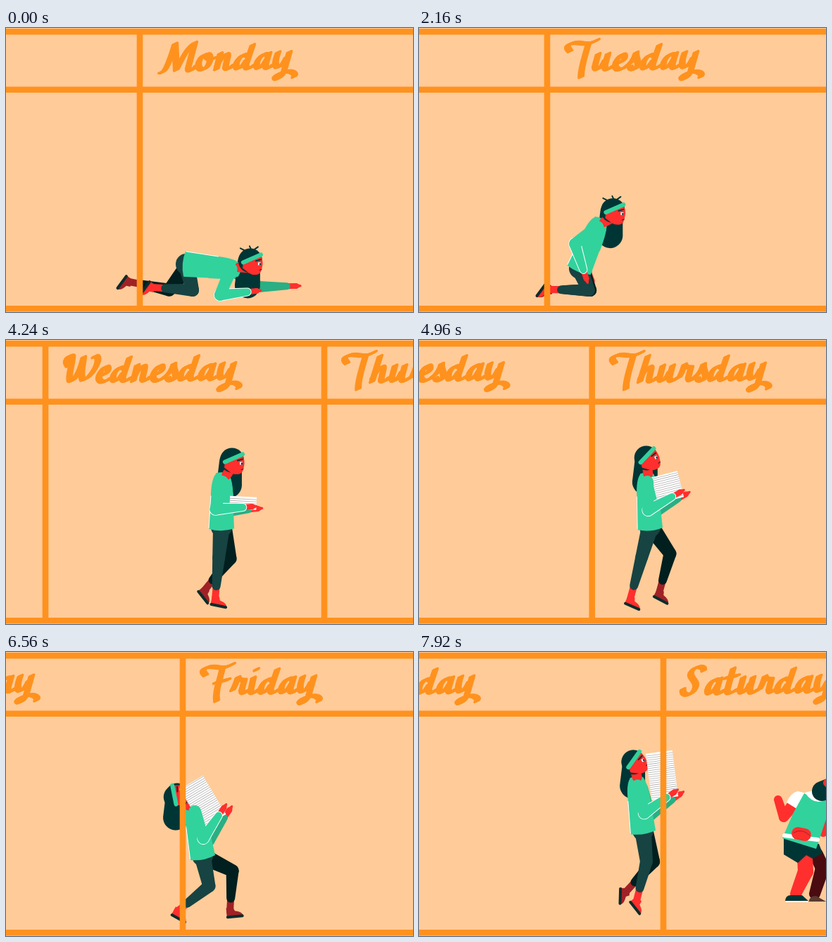
Write an HTML page with a canvas that moves like this. It is 578 px wide and 404 px high and loops after 8000 ms.

```html
<!DOCTYPE html>
<html lang="en">
<head>
<meta charset="utf-8">
<title>Week</title>
<style>
html, body { margin: 0; width: 100%; height: 100%; overflow: hidden; background: #ffcb99; }
canvas { display: block; }
</style>
</head>
<body>
<canvas id="stage" width="578" height="404" role="img"
  aria-label="Monday Tuesday Wednesday Thursday Friday Saturday"></canvas>
<script>
const g = document.getElementById('stage').getContext('2d');
const ORANGE = '#ff921e', PAPER = '#ffcb99', GREEN = '#32d29d', GREEN2 = '#2aae83',
  HAIR = '#003535', PANTS = '#174342', PANTS2 = '#001f1e', SKIN = '#ff2f2d', SKIN2 = '#a02226', SOLE = '#0a2c2c';

// Brush lettering: advance width, then the pen path with the baseline at y = 0
const glyphs = {
  M: [54, 'M3 0C9 3 18-22 24-40L25-3C32-16 42-36 52-41L42-6C41 1 48-1 54-9'],
  T: [38, 'M6-30C-4-40 10-43 22-41C32-39 38-41 45-45M32-39C28-24 21-8 21 7'],
  W: [46, 'M6-26C0-34 6-42 12-40C13-30 5-14 8-5C14-2 24-22 28-38C27-26 22-14 26-6C34-6 46-22 48-32C49-38 46-41 43-38'],
  F: [42, 'M6-30C-4-40 10-43 22-41C32-39 38-41 45-45M30-39C27-24 19-8 21 7M20-19L38-23'],
  S: [33, 'M31-36C32-44 18-43 13-34C9-25 24-22 18-10C12 1-1 0 1-10'],
  o: [25, 'M15-24C6-24 1-12 3-6C5-1 13-2 17-10C21-18 19-25 14-24C14-18 20-15 26-19'],
  n: [28, 'M9-25L3-3M4-8C8-16 14-24 18-24C22-24 16-10 16-5C17-1 22-3 28-9'],
  d: [29, 'M19-21C12-26 3-14 3-7C3-1 10-2 18-15M27-36L17-8C16-1 22-2 29-8'],
  a: [26, 'M19-22C12-26 3-14 3-7C3-1 10-2 18-16M21-24L16-8C15-1 21-2 27-8'],
  y: [33, 'M8-25C4-15 2-5 7-4C12-4 17-12 20-18M24-25L16 1C12 13 3 15 3 10C5 5 22 0 28 4C31 6 32 8 30 10'],
  u: [29, 'M8-25L3-8C3 0 11-3 18-17M22-25L17-8C17-1 22-2 29-8'],
  e: [20, 'M5-12C14-12 18-18 16-23C12-27 2-14 3-7C5 0 13-2 20-8'],
  s: [19, 'M0-8C6-12 11-20 13-26C11-18 18-12 14-6C11-1 5-2 4-6'],
  h: [28, 'M15-39L3-3M4-8C8-16 14-24 18-24C22-24 16-10 16-5C17-1 22-3 28-9'],
  r: [24, 'M2-8C6-14 8-20 10-26C10-22 14-22 19-22L15-8C15-1 20-3 25-8'],
  i: [15, 'M8-25L4-8C3-1 9-2 16-9M12-36L13-37'],
  t: [20, 'M14-38L5-8C4-1 10-2 20-9M3-25L20-28']
};
for (const k in glyphs) glyphs[k][1] = new Path2D(glyphs[k][1]);

const days = [['Monday', 0], ['Tuesday', 421], ['Wednesday', 842], ['Thursday', 1238], ['Friday', 1696], ['Saturday', 2154]];
const scrollKeys = [[0, -190], [1200, 34], [2160, 239], [4240, 786], [5680, 1198.5], [6560, 1445], [7920, 1807]];

// Key poses: time, hip x and y, lean, neck angle, hand from shoulder, paper stack angle and height
const poses = [
  [0, 256, 336, 1.68, 1.35, 60, 31, 0, 0],
  [1600, 256, 336, 1.68, 1.35, 60, 31, 0, 0],
  [2160, 228, 342, .41, .92, -16, 73, 0, 0],
  [2960, 302, 266, .1, .65, 12, 70, 0, 0],
  [4240, 306, 266, .02, .55, 42, 35, .05, 18],
  [5680, 350, 266, -.14, -.37, 51, -6, -.54, 58],
  [6560, 279, 290, -.17, -.78, 41, -5, -.54, 64],
  [7920, 318, 254, -.12, -.04, 52, 9, -.13, 66]
];
// quarter steps of the walk
const paceKeys = [[2160, -5], [4240, 8], [5680, 17], [6560, 21], [7920, 28]];

const mix = (a, b, k) => a + (b - a) * k;
const ease = k => k * k * (3 - 2 * k);
const ramp = (t, from, to) => ease(Math.max(0, Math.min(1, (t - from) / (to - from))));
function sample(keys, t, curve = k => k) {
  let i = 0;
  while (i < keys.length - 2 && t >= keys[i + 1][0]) i++;
  const a = keys[i], b = keys[i + 1], k = curve((t - a[0]) / (b[0] - a[0]));
  return a.slice(1).map((v, n) => mix(v, b[n + 1], k));
}

const toward = (a, b, k) => [mix(a[0], b[0], k), mix(a[1], b[1], k)];
const swing = ([x, y], length, angle) => [x + length * Math.sin(angle), y - length * Math.cos(angle)];
function joint(a, c, la, lb, side) {
  const dx = c[0] - a[0], dy = c[1] - a[1], d = Math.hypot(dx, dy);
  const bend = Math.acos(Math.max(-1, Math.min(1, (la * la + d * d - lb * lb) / (2 * la * d))));
  const ang = Math.atan2(dy, dx) + side * bend;
  return [a[0] + la * Math.cos(ang), a[1] + la * Math.sin(ang)];
}
function taper(a, b, ra, rb, color) {
  const ang = Math.atan2(b[1] - a[1], b[0] - a[0]);
  g.fillStyle = color;
  g.beginPath();
  g.arc(...a, ra, ang + Math.PI / 2, ang - Math.PI / 2);
  g.arc(...b, rb, ang - Math.PI / 2, ang + Math.PI / 2);
  g.fill();
}
function shape(path, color) {
  g.fillStyle = color;
  g.fill(new Path2D(path));
}
function line(path, color, width) {
  g.strokeStyle = color;
  g.lineWidth = width;
  g.stroke(new Path2D(path));
}
function placed([x, y], angle, draw) {
  g.save();
  g.translate(x, y);
  g.rotate(angle);
  draw();
  g.restore();
}

// Foot from the hip: x, ground y, toe angle; side is 1 for the near leg, -1 for the far one
function foot(t, side) {
  const kneel = ramp(t, 1600, 2160);
  const down = [mix(-66 + 18 * side * Math.cos(t * Math.PI / 400), -44, kneel), mix(365 + 4 * side, 372, kneel), 2.2];
  const phase = sample(paceKeys, t)[0] * Math.PI / 2, s = side * Math.sin(phase), c = side * Math.cos(phase);
  const lift = Math.max(0, -c), hop = ramp(t, 7600, 7920);
  const up = [9 * c - 36 * s - 18 * c * c, 369 - 13 * lift - 15 * hop, .2 + .3 * s + .7 * lift + .7 * hop];
  return down.map((v, i) => mix(v, up[i], ramp(t, 2200, 2960)));
}
function leg(hip, [x, y, angle], cloth, skin) {
  const ankle = [hip[0] + x, y], knee = joint(hip, ankle, 44, 58, -1);
  knee[1] = Math.min(knee[1], 373);
  const cuff = toward(knee, ankle, .68);
  taper(cuff, ankle, 5, 5, skin);
  placed(ankle, angle, () => {
    shape('M-5-5L5-5L7 0Q17 2 18 7L-5 7Z', skin);
    line('M-4 8L17 8', SOLE, 4);
  });
  taper(hip, knee, 12, 9, cloth);
  taper(knee, cuff, 9, 6, cloth);
}
function arm(shoulder, hand, cloth, rim) {
  const elbow = joint(shoulder, hand, 40, 52, 1), wrist = toward(elbow, hand, .75);
  taper(wrist, hand, 4, 4, SKIN);
  taper(hand, toward(wrist, hand, 1.5), 4, 1.5, SKIN);
  if (rim) taper(elbow, wrist, 9, 6, '#fff');
  taper(shoulder, elbow, 9, 8, cloth);
  taper(elbow, wrist, 8, 5, cloth);
}
function head(messy) {
  taper([-2, -5], [-2, -6], 17, 17, HAIR);
  shape('M-13 5L-12-3L13-13Q17-4 15 3Q14 12 9 14Q2 16-4 12Z', SKIN);
  line('M-12-3L13-14', GREEN, 6);
  line('M6-5L13-7', HAIR, 2);
  g.fillStyle = '#fff';
  g.fillRect(9, -3, 4, 4);
  g.fillStyle = HAIR;
  g.fillRect(11, -2, 2, 3);
  line('M11 8L14 7', HAIR, 1);
  if (messy) line('M-6-18L-16-23M0-20L-3-26M2-20L9-25', HAIR, 2);
}
function stack(angle, height) {
  g.fillStyle = '#fff';
  g.fillRect(-19, -height, 38, height);
  g.fillStyle = '#b0b0b0';
  for (let y = 3; y < height; y += 3) g.fillRect(-19, -y, 38, .8);
}

function woman(t) {
  const [hx, hy, lean, neck, dx, dy, tilt, height] = sample(poses, t, ease);
  const hip = [hx, hy], shoulder = swing(hip, 64, lean), face = swing(shoulder, 30, neck);
  const crawl = 1 - ramp(t, 1600, 2160), reach = 24 * crawl * Math.cos(t * Math.PI / 400);
  const [sx, sy] = shoulder, hand = [sx + dx - reach, sy + dy];
  arm([sx + 6, sy + 4], [sx + dx + reach + 8, sy + dy + 3 - 10 * crawl], GREEN2);
  leg([hx + 3, hy + 2], foot(t, -1), PANTS2, SKIN2);
  taper([face[0] - 4, face[1] - 3], [face[0] - 6, face[1] + 30], 16, 18, HAIR);
  taper(hip, swing(hip, 8, lean), 15, 15, PANTS);
  leg(hip, foot(t, 1), PANTS, SKIN);
  placed(shoulder, lean, () => {
    const torso = 'M-9-12Q0-15 9-11Q15 0 16 30L18 66Q0 72-18 67L-16 20Q-16-4-9-12Z';
    line(torso.split('L')[0], GREEN, 1);
    shape(torso, GREEN);
    line('M-18 66L-16 20', '#fff', 1);
  });
  taper(toward(shoulder, face, .4), [face[0] - 3, face[1] + 5], 7, 7, SKIN);
  placed(face, 1.1 * Math.min(0, neck - .45), () => head(t < 2900));
  placed([hand[0] - 13, hand[1] + 5 - 25 * tilt], tilt, () => stack(tilt, height));
  arm(shoulder, hand, GREEN, true);
}

function man(x, t) {
  g.save();
  g.translate(x, 0);
  taper([60, 288], [69, 307], 10, 10, '#4a0c10');
  taper([69, 307], [58, 344], 10, 8, '#4a0c10');
  taper([44, 292], [45, 312], 11, 11, SKIN);
  taper([45, 312], [31, 344], 11, 8, SKIN);
  shape('M16 355Q16 346 24 346L40 346L50 355Z', HAIR);
  shape('M50 355Q50 347 60 347L74 355Z', '#5a3a30');
  line('M17 355L48 355', '#fff', 2);
  g.translate(0, 4 * Math.sin((7920 - t) / 130));
  shape('M14 265L64 273L69 286L55 294L46 289L34 300L14 288Z', HAIR);
  taper([76, 238], [70, 257], 6, 6, SKIN);
  taper([30, 214], [14, 235], 9, 7, SKIN);
  taper([14, 235], [6, 210], 7, 6, SKIN);
  shape('M34 198Q24 200 18 214L34 224L46 201Z', '#fff');
  shape('M43 201L64 212L78 205L75 235L60 280L12 265L27 230Z', GREEN);
  shape('M44 200Q56 218 72 211L74 203L56 197Z', '#fff');
  line('M15 261L62 267', '#fff', 6);
  placed([39, 259], .2, () => taper([-5, 0], [5, 0], 9, 9, SKIN));
  line('M28 257Q40 250 51 261', SKIN2, 1);
  taper([68, 198], [78, 194], 14, 14, HAIR);
  taper([76, 186], [82, 190], 6, 8, SKIN);
  g.restore();
}

function word(text, x) {
  placed([x, 63], -.02, () => {
    g.strokeStyle = ORANGE;
    g.lineWidth = 3.2;
    for (const ch of text) {
      const [advance, path] = glyphs[ch];
      for (let k = -1; k <= 1; k += .25) {
        g.translate(3.4 * k, -1.5 * k);
        g.stroke(path);
        g.translate(-3.4 * k, 1.5 * k);
      }
      g.translate(advance, 0);
    }
  });
}

function draw(t) {
  const [scroll] = sample(scrollKeys, t);
  g.lineCap = g.lineJoin = 'round';
  g.fillStyle = PAPER;
  g.fillRect(0, 0, 578, 404);
  g.fillStyle = ORANGE;
  for (const y of [1, 83.5, 395]) g.fillRect(0, y, 578, 8.5);
  for (const [name, x] of days) word(name, x - scroll + 27);
  man(2311 - scroll, t);
  woman(t);
  g.fillStyle = ORANGE;
  for (const [, x] of days) g.fillRect(x - scroll - 4.3, 5, 8.6, 394);
}

function tick(now) {
  draw(Math.floor(now % 8000 / 80) * 80);
  requestAnimationFrame(tick);
}
draw(0);
requestAnimationFrame(tick);
</script>
</body>
</html>
```
